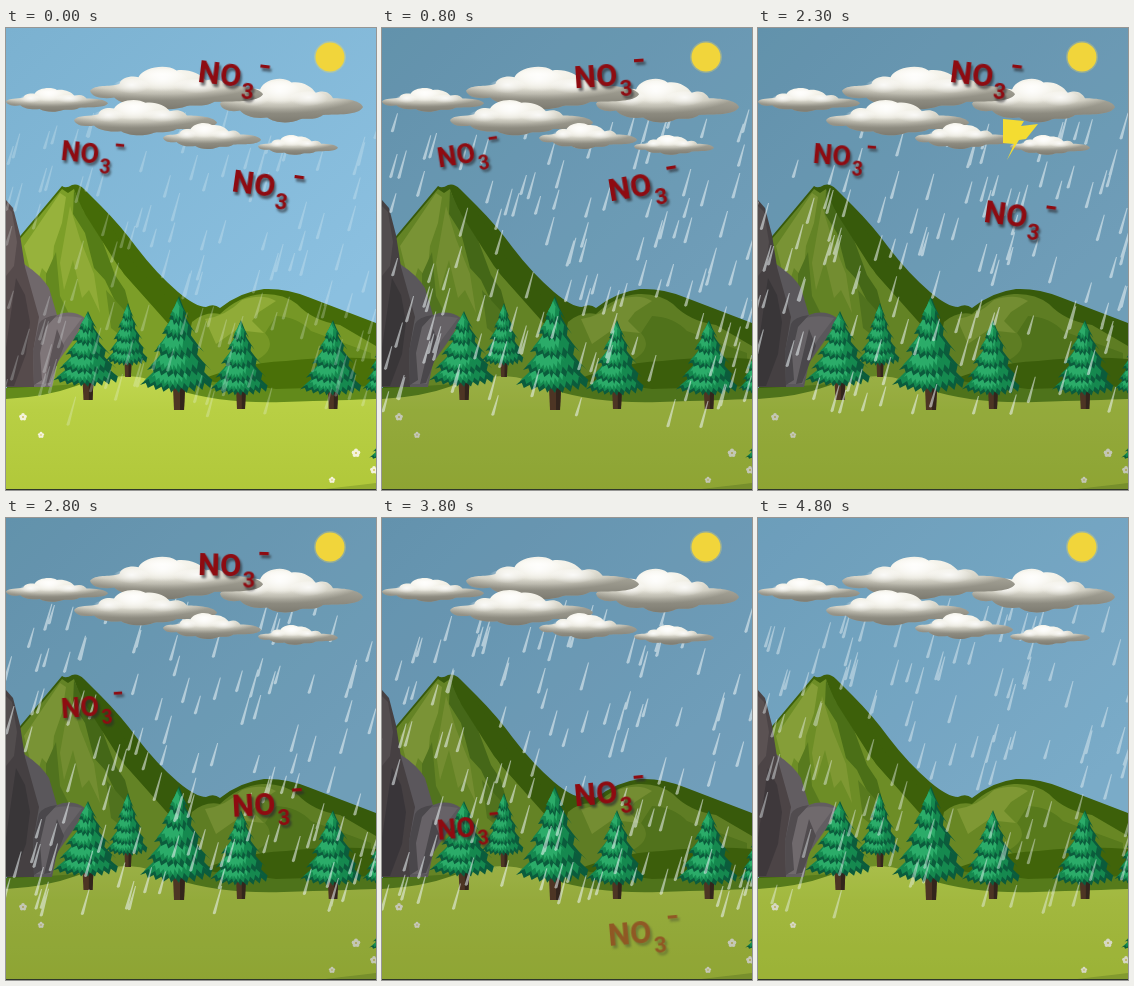
An HTML page that plays this animation: 370 px wide and 462 px high, repeating every 4900 ms.

```html
<!DOCTYPE html>
<html lang="en">
<head>
<meta charset="utf-8">
<title>Nitrate rain</title>
<style>
html, body { margin: 0; height: 100%; overflow: hidden; }
svg { display: block; width: 100vw; height: 100vh; }
.ion { font: 700 31px Roboto, "Open Sans", sans-serif; fill: #8e0b11; filter: drop-shadow(2px 3px 1px rgba(40,40,45,.65)); }
.sub { font-size: 22px; }
</style>
</head>
<body>
<svg viewBox="0 0 370 462" preserveAspectRatio="none">
<defs>
  <linearGradient id="sky" x2=".6" y2=".8">
    <stop stop-color="#7bb1d0"/><stop offset="1" stop-color="#8bc0e0"/>
  </linearGradient>
  <linearGradient id="grass" x2="0" y2="1">
    <stop stop-color="#c0d650"/><stop offset=".3" stop-color="#b8cf44"/><stop offset="1" stop-color="#b1c83a"/>
  </linearGradient>
  <radialGradient id="cloudFill" cx=".42" cy=".18" r=".62">
    <stop stop-color="#fefdf8"/><stop offset=".4" stop-color="#efede3"/>
    <stop offset=".75" stop-color="#d2d0c4"/><stop offset="1" stop-color="#a3a195"/>
  </radialGradient>
  <linearGradient id="cloudShade" x2="0" y2="1">
    <stop offset=".5" stop-color="#76746a" stop-opacity="0"/><stop offset="1" stop-color="#76746a" stop-opacity=".85"/>
  </linearGradient>
  <radialGradient id="puff" cy=".35">
    <stop stop-color="#fff" stop-opacity=".8"/><stop offset="1" stop-color="#fff" stop-opacity="0"/>
  </radialGradient>
  <path id="cloudShape" d="M0 14C3 10 11 12 17 10C18 6 24 5 28 6C31 0 44-2 50 2C57 1 64 4 67 8C73 6 77 8 79 11C87 11 98 12 100 16C97 21 82 20 72 20.5C66 24 60 22 56 23C48 26 38 25 33 22C24 23 17 21 14 18C8 19 1 18 0 14Z"/>
  <g id="cloud">
    <use href="#cloudShape" fill="url(#cloudFill)"/>
    <use href="#cloudShape" fill="url(#cloudShade)"/>
    <ellipse cx="42" cy="9" rx="15" ry="8" fill="url(#puff)"/>
    <ellipse cx="62" cy="12" rx="14" ry="5" fill="url(#puff)"/>
    <ellipse cx="24" cy="12" rx="11" ry="5" fill="url(#puff)"/>
  </g>
  <g id="tree"></g>
  <g id="flower" fill="#f4f3dc">
    <circle cy="-2.2" r="1.8"/><circle cx="2.1" cy="-.5" r="1.8"/><circle cx="1.3" cy="1.8" r="1.8"/>
    <circle cx="-1.3" cy="1.8" r="1.8"/><circle cx="-2.1" cy="-.5" r="1.8"/><circle r="1" fill="#d8c96a"/>
  </g>
  <g id="ion">
    <text x="-34" y="10">NO</text><text class="sub" x="11" y="21">3</text>
    <rect x="27" y="-15" width="9.5" height="3.2"/>
  </g>
</defs>

<rect width="370" height="462" fill="url(#sky)"/>

<!-- mountains -->
<path fill="#456b08" d="M10 213L56 158Q60 161 66 157Q72 155 78 161L95 178Q115 198 131 220Q150 245 172 264Q190 279 200 279Q208 275 214 280Q234 264 258 261Q280 260 302 269L370 295V375H0Z"/>
<path fill="#7c9e28" d="M14 211L56 161L62 165L68 161L74 178Q98 213 118 246L166 300V365H30Z"/>
<path fill="#97b23c" d="M54 165L60 169L56 195L48 218L45 250L36 240L29 262L18 218Z"/>
<path fill="#557c17" d="M68 162L76 180L96 212L109 247L119 262L129 300L110 275L99 252L88 240L79 205L67 186Z"/>
<path fill="#90ab37" d="M64 178L74 211L88 246L94 285L83 262L76 270L67 232L58 262L54 235Z"/>
<path fill="#64891f" d="M40 246L50 224L54 268L65 290L40 300ZM100 262L118 282L130 320L105 300Z"/>
<path fill="#456b08" d="M70 160L79 166Q106 196 124 230Q147 262 186 284L172 300Q136 268 112 238L79 186Z"/>
<path fill="#769726" d="M186 294Q199 283 214 286Q233 268 256 266Q277 265 291 276Q307 293 334 297L370 318V365H170Z"/>
<path fill="#90ab38" d="M199 291Q220 288 236 272Q257 265 270 273L253 284L246 293L258 305L230 302L210 316Z"/>
<path fill="#64891c" d="M270 288Q292 289 305 303L365 325V350H270L251 332Q272 320 259 305Z"/>
<path fill="#4a7008" d="M180 358Q230 335 280 333Q330 327 370 331V378H170Z"/>
<path fill="#628a1b" d="M0 360Q60 358 110 352T270 361L370 358V380H0Z"/>

<!-- rocks -->
<path fill="#70686b" d="M18 236Q35 247 43 260L51 287Q66 281 79 290L70 308L51 335L46 359H0V240Z"/>
<path fill="#564b4c" d="M0 172L7 180L14 207L19 239L33 289L27 324L28 359H0Z"/>
<path fill="#675b5b" d="M0 178L6 184L11 214L8 238L0 248Z"/>
<path fill="#473e40" d="M10 250L19 267L24 294L20 326L8 358H0V320Z"/>
<path fill="#7f7679" d="M34 295Q53 285 76 290L61 310L51 326L45 356H30Z"/>
<path fill="#5c5457" d="M51 287Q36 289 33 296L27 323L28 357L36 352L34 325L40 299ZM51 301L58 318L44 355L38 356Z"/>

<path fill="url(#grass)" d="M0 371Q40 369 70 358Q95 348 122 348Q146 349 172 362Q215 376 278 374T370 371V462H0Z"/>
<path d="M310 462Q336 459 370 455V462Z" fill="#94ad31"/>
<use href="#flower" x="17" y="389"/><use href="#flower" transform="translate(35 407)scale(.8)"/>
<use href="#flower" transform="translate(350 425)scale(1.1)"/><use href="#flower" transform="translate(326 452)scale(.8)"/>
<use href="#flower" x="368" y="442"/>
<rect id="dim" width="370" height="462" fill="#00141c"/>
<rect y="461" width="370" height="1" fill="#30382a"/>

<use href="#tree" transform="translate(122 275)scale(.58 .65)"/>
<use href="#tree" transform="translate(82 283)scale(.9 .78)"/>
<use href="#tree" transform="translate(173 268)"/>
<use href="#tree" transform="translate(235 292)scale(.8 .78)"/>
<use href="#tree" transform="translate(378 306)scale(.55 .62)"/>
<use href="#tree" transform="translate(327 292)scale(.85 .78)"/>
<use href="#tree" transform="translate(382 394)scale(.48 .4)"/>

<path id="rain" fill="#eef6f8"/>

<circle cx="324" cy="29" r="16" fill="#f2dc62" opacity=".3"/>
<circle cx="324" cy="29" r="14.5" fill="#f1d53b"/>
<use href="#cloud" transform="translate(214 51)scale(1.43 1.75)"/>
<use href="#cloud" transform="translate(84 39)scale(1.73 1.7)"/>
<use href="#cloud" transform="translate(0 60)scale(1.02 .96)"/>
<use href="#cloud" transform="translate(68 72)scale(1.43 1.42)"/>
<use href="#cloud" transform="translate(157 95)scale(.98 1.05)"/>
<use href="#cloud" transform="translate(252 107)scale(.8 .8)"/>
<path id="bolt" fill="#f4dc31" d="M245 91L266 93L263 98L280 96L268 111L261 112L249 132L256 116L245 115Z"/>

<use class="ion" href="#ion"/><use class="ion" href="#ion"/><use class="ion" href="#ion"/>
</svg>
<script>
const LOOP = 4900, STEP = 100;
const $ = id => document.getElementById(id);
let seed = 7;
const rand = () => (seed = seed * 16807 % 2147483647) / 2147483647;

// One ragged layer of branches with drooping needles
function tier(x, top, bottom, half, teeth, fill) {
  const mid = top + (bottom - top) * .55;
  let d = `M${x} ${top}Q${x - half * .42} ${mid} ${x - half} ${bottom}`;
  for (let i = 1; i <= teeth; i++) {
    const tip = -half + 2 * half * i / teeth, drop = 8 * (1 - (tip / half) ** 2);
    const lean = Math.sign(tip) * half * .5 / teeth;
    d += `L${x + tip - half / teeth - lean} ${bottom - 5 + drop}L${x + tip} ${bottom + drop}`;
  }
  return `<path fill="${fill}" d="${d}Q${x + half * .42} ${mid} ${x} ${top}Z"/>`;
}
const tiers = [[46, 89, 39, 10], [33, 74, 32, 9], [20, 56, 25, 7], [8, 38, 17, 6], [0, 23, 10, 4]];
$('tree').innerHTML = '<path fill="#4d3524" d="M-6 92H6L5 114H-5Z"/><path fill="#33251c" d="M1 92H6L5 114H1Z"/>' +
  tiers.map(([top, bottom, half, n]) =>
    tier(0, top, bottom, half, n, '#0b5c3c') +
    tier(-half * .08, top + 2, bottom - 4, half * .82, n, '#15894f') +
    tier(-half * .2, top + 5, bottom - 8, half * .5, n - 1, '#2bac69')
  ).join('');

const drops = Array.from({length: 160}, () => ({x: rand() * 455, phase: rand(), len: 17 + rand() * 11}));

const smooth = u => u * u * (3 - 2 * u);
const linear = u => u;

// Value at time t from alternating times and values
function at(keys, t, ease = smooth) {
  if (t <= keys[0]) return keys[1];
  for (let i = 2; i < keys.length; i += 2) {
    if (t < keys[i]) {
      const u = (t - keys[i - 2]) / (keys[i] - keys[i - 2]);
      return keys[i - 1] + (keys[i + 1] - keys[i - 1]) * ease(u);
    }
  }
  return keys[keys.length - 1];
}

const ions = [
  {x: 226, y: 48, size: 1, fall: [3160, 0, 4230, 380], fade: [4200, 1, 4650, 0],
    tilt: [0, 7, 1150, -7, 2300, 7, 3500, -7, 4900, 7]},
  {x: 85, y: 126, size: .88, fall: [2280, 0, 4700, 293], fade: [4300, 1, 4750, 0],
    tilt: [0, 6, 800, -9, 1600, 5, 2300, 5, 3200, -11, 4400, 0]},
  {x: 260, y: 158, size: 1, fall: [2145, 0, 3450, 257], fade: [3550, 1, 4050, 0],
    tilt: [0, 8, 900, -10, 2250, 8, 3200, -10, 4400, 0]}
];
const ionNodes = document.querySelectorAll('.ion');

function draw(t) {
  $('dim').setAttribute('opacity', at([0, 0, 600, .2, 3500, .2, 4900, .12], t));
  $('bolt').setAttribute('opacity', at([1900, 0, 2100, 1, 2500, 1, 2700, 0], t));
  $('rain').setAttribute('opacity', at([0, .25, 500, .55, 4300, .55, 4900, .42], t));
  $('rain').setAttribute('d', drops.map(({x, phase, len}) => {
    const fallen = (phase + t / 900) % 1 * 295, px = x - fallen * .25, py = 78 + fallen;
    return `M${px} ${py}l${-len * .25 - 1.8} ${len}q1.3 2.2 3.2 0l${len * .25 - .4} ${-len}Z`;
  }).join(''));
  ions.forEach((ion, i) => {
    ionNodes[i].setAttribute('transform',
      `translate(${ion.x} ${ion.y + at(ion.fall, t, linear)})rotate(${at(ion.tilt, t)})scale(${ion.size})`);
    ionNodes[i].setAttribute('opacity', at(ion.fade, t));
  });
}

const start = performance.now();
function frame() {
  const t = (performance.now() - start) % LOOP;
  draw(Math.floor(t / STEP) * STEP);
  requestAnimationFrame(frame);
}
frame();
</script>
</body>
</html>
```
